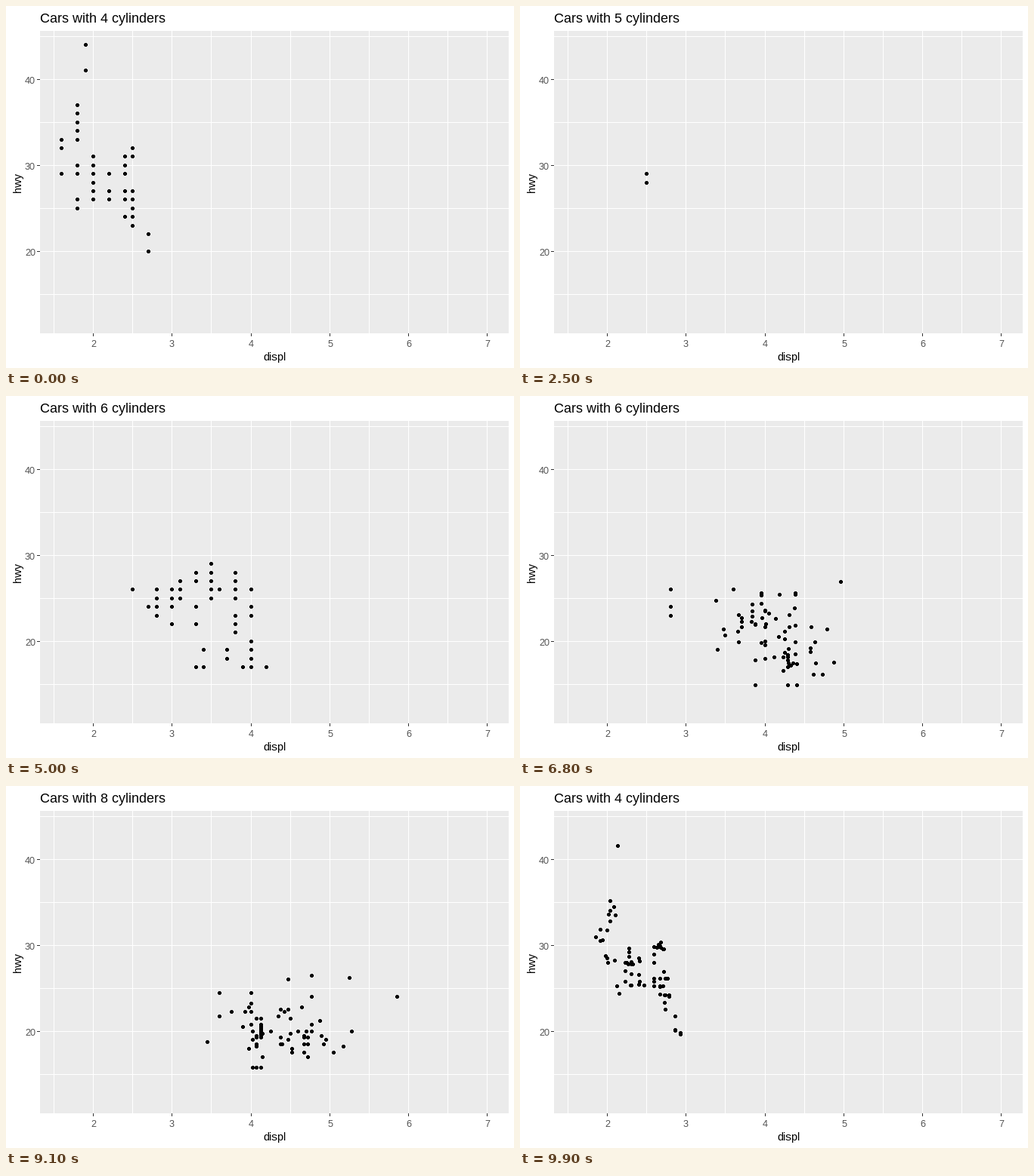
Animation, 672 px wide and 480 px high, one loop 10 s. Source, as a matplotlib script:

```python
import numpy as np
import matplotlib.pyplot as plt
from matplotlib.animation import FuncAnimation
from matplotlib.collections import PolyCollection
from matplotlib.patches import Rectangle

plt.rcParams.update({"font.family": "Liberation Sans",
                     "text.hinting": "native", "text.hinting_factor": 1})

WIDTH, HEIGHT, DPI = 672, 480, 96
LEFT, TOP, RIGHT, BOTTOM = 45, 33, 665, 434
CYCLE = 25      # frames per state, hold and move together
MOVE = 12       # frames for which leaving points stay visible

# Each run is an engine size followed by the mileages of its cars.
FOUR = [
    (1.8, 29, 29), (2.0, 31, 30), (1.8, 26, 25), (2.0, 28, 27),
    (2.4, 27, 30, 24), (1.6, 33, 32, 32, 29, 32), (1.8, 34, 36, 36),
    (2.0, 29), (2.4, 26, 27, 30, 31), (2.0, 26, 29, 28, 27), (2.4, 29, 27),
    (2.5, 31, 32, 25, 24, 27, 25, 26, 23), (2.2, 26, 26),
    (2.5, 26, 26, 25, 27, 25, 27), (2.7, 20, 20), (2.2, 29, 27),
    (2.4, 31, 31), (2.2, 27, 29), (2.4, 31, 31), (1.8, 30, 33, 35, 37, 35),
    (2.7, 20, 20, 22), (2.0, 29, 26, 29, 29), (1.9, 44),
    (2.0, 29, 26, 29, 29), (1.9, 44, 41), (2.0, 29, 26), (1.8, 29, 29),
    (2.0, 28, 29),
]
FIVE = [(2.5, 29, 29, 28, 29)]
SIX = [
    (2.8, 26, 26), (3.1, 27), (2.8, 25, 25), (3.1, 25, 25), (2.8, 24),
    (3.1, 25, 26), (3.5, 29), (3.6, 26), (3.0, 24), (3.3, 22, 22, 24, 24, 17),
    (3.8, 22, 21, 23), (4.0, 23), (3.7, 19, 18), (3.9, 17, 17, 17),
    (4.0, 17, 19, 17, 19), (4.2, 17, 17), (3.8, 26, 25), (4.0, 26, 24),
    (2.5, 26, 26), (3.3, 28), (2.7, 24, 24, 24), (3.0, 22), (3.7, 19),
    (4.0, 20, 17, 19), (3.5, 27, 26), (3.0, 26, 25), (3.5, 25),
    (3.3, 17, 17), (4.0, 20), (3.1, 26), (3.8, 26, 27, 28), (3.4, 19, 17),
    (4.0, 20), (3.0, 26, 26), (3.5, 28), (3.0, 26, 26), (3.3, 27),
    (3.4, 17, 19), (4.0, 18, 20), (2.8, 24, 23, 24, 26, 26), (3.6, 26),
]
EIGHT = [
    (4.2, 23), (5.3, 20, 15, 20), (5.7, 17), (6.0, 17), (5.7, 26, 23),
    (6.2, 26, 25), (7.0, 24), (5.3, 19, 14), (5.7, 15), (6.5, 17),
    (4.7, 19, 19, 12), (5.2, 17, 15), (4.7, 17, 12, 17), (5.2, 16),
    (5.7, 18), (5.9, 15), (4.7, 16, 12, 17, 17, 16, 12), (5.2, 15, 16),
    (5.7, 17), (5.9, 15), (4.6, 17), (5.4, 17, 18), (4.6, 19), (5.0, 17),
    (4.6, 16, 16, 17), (5.4, 15, 17), (4.6, 21, 22, 23, 22), (5.4, 20),
    (4.7, 17, 12, 19), (5.7, 18), (6.1, 14), (4.0, 15), (4.2, 18),
    (4.4, 18), (4.6, 15), (5.4, 17, 16, 18), (4.6, 19), (5.0, 17),
    (5.6, 18), (5.3, 25), (4.7, 17, 15), (5.7, 18),
]


def expand(runs):
    return np.array([(displ, hwy) for displ, *mileages in runs
                     for hwy in mileages])


CYLINDERS = [4, 5, 6, 8]
STATES = [expand(runs) for runs in (FOUR, FIVE, SIX, EIGHT)]


def to_pixel(displ, hwy):
    x = 45.23 + (displ - 1.33) / 5.94 * 619.36
    y = 324.8 - 11.4 * (hwy - 20)
    return np.floor(x + 0.5), np.floor(y + 0.5)


# Five pixels wide with the corners cut, relative to the centre pixel
DOT = np.array([(-1, -2), (2, -2), (2, -1), (3, -1), (3, 2), (2, 2),
                (2, 3), (-1, 3), (-1, 2), (-2, 2), (-2, -1), (-1, -1)])


def dots(points):
    centres = np.column_stack(to_pixel(points[:, 0], points[:, 1]))
    return centres[:, None, :] + DOT


fig = plt.figure(figsize=(WIDTH / DPI, HEIGHT / DPI), dpi=DPI,
                 facecolor="white")
ax = fig.add_axes([0, 0, 1, 1])
ax.set(xlim=(0, WIDTH), ylim=(HEIGHT, 0))
ax.axis("off")


def box(x, y, w, h, color):
    ax.add_patch(Rectangle((x, y), w, h, facecolor=color, linewidth=0,
                           antialiased=False))


def label(x, y, text, px, color="black", **kw):
    return ax.text(x, y, text, fontsize=px * 72 / DPI, color=color,
                   va="baseline", **kw)


box(LEFT, TOP, RIGHT - LEFT, BOTTOM - TOP, "#EBEBEB")
for displ in np.arange(1.5, 7.1, 0.5):
    x, _ = to_pixel(displ, 20)
    box(x, TOP, 1, BOTTOM - TOP, "white")
    if displ % 1 == 0:
        box(x, BOTTOM, 1, 4, "#333333")
        label(x + 0.5, 452, f"{displ:.0f}", 12, "#4D4D4D", ha="center")
for hwy in range(15, 46, 5):
    _, y = to_pixel(2, hwy)
    box(LEFT, y, RIGHT - LEFT, 1, "white")
    if hwy in (20, 30, 40):
        box(LEFT - 4, y, 4, 1, "#333333")
        label(39, y + 6, str(hwy), 12, "#4D4D4D", ha="right")

label(355, 470, "displ", 15, ha="center")
ax.text(20, 234, "hwy", fontsize=15 * 72 / DPI, rotation=90,
        rotation_mode="anchor", ha="center", va="baseline")
title = label(LEFT, 22, "", 18)
cloud = PolyCollection([], facecolor="black", edgecolor="none", linewidth=0,
                       antialiased=False)
ax.add_collection(cloud, autolim=False)


def update(frame):
    state, local = divmod(frame, CYCLE)
    following = (state + 1) % len(STATES)
    hold = 12 if state == 0 else 13
    moved = max(0, local - hold)
    share = moved / (CYCLE - hold)

    old, new = STATES[state], STATES[following]
    if moved:
        paired = min(len(old), len(new))
        points = old[:paired] + share * (new[:paired] - old[:paired])
        if moved < MOVE:
            points = np.vstack([points, old[paired:]])
    else:
        points = old

    cloud.set_verts(dots(points))
    closest = CYLINDERS[following if share >= 0.5 else state]
    title.set_text(f"Cars with {closest} cylinders")
    return cloud, title


animation = FuncAnimation(fig, update, frames=CYCLE * len(STATES),
                          interval=100, repeat=True, blit=False)
plt.show()
```
